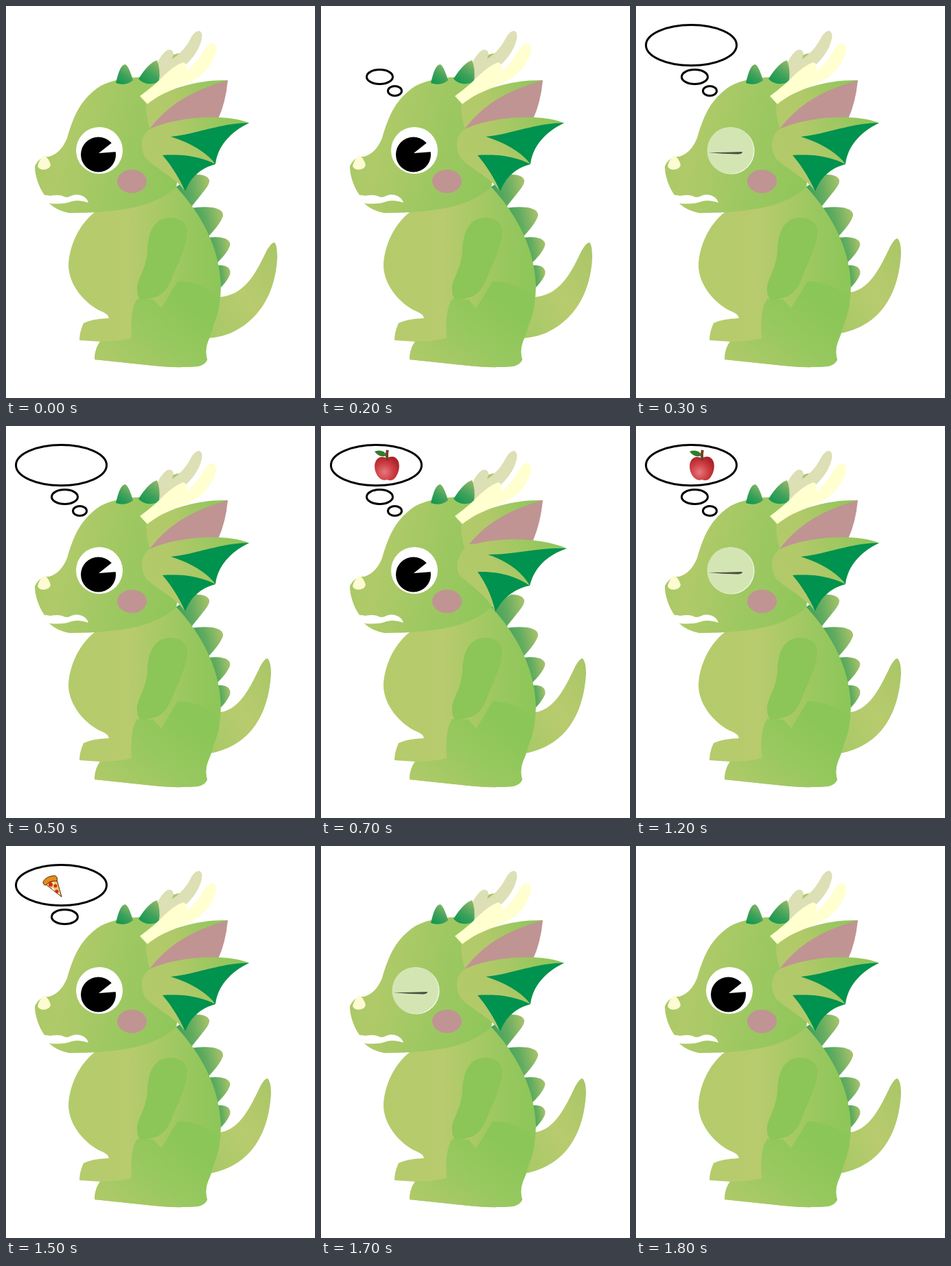
Write an HTML page that moves like this. It is 450 px wide and 570 px high and loops after 1.9 s.

```html
<!DOCTYPE html>
<html lang="en">
<head>
<meta charset="utf-8">
<title>Hungry little dragon</title>
<style>
  html, body { margin: 0; width: 100%; height: 100%; overflow: hidden; background: #fff; }
  svg { display: block; width: 100vw; height: 100vh; }

  /* The 1900 ms loop has 19 beats; every change is a hard cut. */
  .cut { animation: 1900ms step-end infinite; }
  .tail-down { animation-name: tail-down; }
  .tail-up { animation-name: tail-up; }
  .ear-rest { animation-name: ear-rest; }
  .ear-flick { animation-name: ear-flick; }
  .eye-open { animation-name: eye-open; }
  .eye-shut { animation-name: eye-shut; }
  .puff-small { animation-name: puff-small; }
  .puff-medium { animation-name: puff-medium; }
  .puff-large { animation-name: puff-large; }
  .apple { animation-name: apple; }
  .pizza { animation-name: pizza; }

  @keyframes tail-down {
    0%, 10.52%, 21.05% { visibility: visible; }
    5.26%, 15.78%, 26.31%, 100% { visibility: hidden; }
  }
  @keyframes tail-up {
    0%, 10.52%, 21.05% { visibility: hidden; }
    5.26%, 15.78%, 26.31%, 100% { visibility: visible; }
  }
  @keyframes ear-rest {
    0%, 42.1%, 52.63%, 100% { visibility: visible; }
    36.84%, 47.36% { visibility: hidden; }
  }
  @keyframes ear-flick {
    0%, 42.1%, 52.63%, 100% { visibility: hidden; }
    36.84%, 47.36% { visibility: visible; }
  }
  @keyframes eye-open {
    0%, 21.05%, 68.42%, 94.73%, 100% { visibility: visible; }
    15.78%, 63.15%, 89.47% { visibility: hidden; }
  }
  @keyframes eye-shut {
    0%, 21.05%, 68.42%, 94.73%, 100% { visibility: hidden; }
    15.78%, 63.15%, 89.47% { visibility: visible; }
  }
  @keyframes puff-small {
    0%, 78.94%, 100% { visibility: hidden; }
    5.26% { visibility: visible; }
  }
  @keyframes puff-medium {
    0%, 84.21%, 100% { visibility: hidden; }
    10.52% { visibility: visible; }
  }
  @keyframes puff-large {
    0%, 89.47%, 100% { visibility: hidden; }
    15.78% { visibility: visible; }
  }
  @keyframes apple {
    0%, 73.68%, 100% { visibility: hidden; }
    36.84% { visibility: visible; }
  }
  @keyframes pizza {
    0%, 89.47%, 100% { visibility: hidden; }
    73.68% { visibility: visible; }
  }
</style>
</head>
<body>
<svg viewBox="0 0 450 570">
  <defs>
    <linearGradient id="skin" x1="0" y1=".4" x2="1" y2=".6">
      <stop offset="0" stop-color="#a8c866"/>
      <stop offset=".2" stop-color="#b0ca69"/>
      <stop offset=".55" stop-color="#9fc862"/>
      <stop offset="1" stop-color="#8ec65a"/>
    </linearGradient>
    <linearGradient id="belly">
      <stop offset="0" stop-color="#b4cb6b"/>
      <stop offset=".4" stop-color="#b8cb6e"/>
      <stop offset=".8" stop-color="#98c75f"/>
      <stop offset="1" stop-color="#8cc658"/>
    </linearGradient>
    <linearGradient id="leg" x1="0" y1="1" x2=".8" y2=".3">
      <stop offset="0" stop-color="#b2ca6a"/>
      <stop offset=".6" stop-color="#97c85f"/>
      <stop offset="1" stop-color="#8bc658"/>
    </linearGradient>
    <linearGradient id="ear" x1="0" y1=".6" x2="1" y2=".3">
      <stop offset="0" stop-color="#b3ca6a"/>
      <stop offset=".35" stop-color="#b2c96a"/>
      <stop offset="1" stop-color="#8fc65a"/>
    </linearGradient>
    <linearGradient id="tail" x1="0" y1="1" x2="1" y2="0">
      <stop offset="0" stop-color="#a6c966"/>
      <stop offset=".5" stop-color="#b8cb6e"/>
      <stop offset="1" stop-color="#a9c667"/>
    </linearGradient>
    <linearGradient id="spike" x1="0" y1=".6" x2="1" y2=".4">
      <stop offset="0" stop-color="#369f5a"/>
      <stop offset=".5" stop-color="#62ac60"/>
      <stop offset="1" stop-color="#a4c169"/>
    </linearGradient>
    <linearGradient id="crest" x1=".2" y1="1" x2=".8" y2="0">
      <stop offset="0" stop-color="#129750"/>
      <stop offset=".45" stop-color="#3da15a"/>
      <stop offset="1" stop-color="#8eb768"/>
    </linearGradient>
    <radialGradient id="fruit" cx=".4" cy=".65" r=".65">
      <stop offset="0" stop-color="#e27a7c"/>
      <stop offset=".55" stop-color="#cf3f45"/>
      <stop offset="1" stop-color="#ad2229"/>
    </radialGradient>
  </defs>

  <!-- tail -->
  <path class="cut tail-down" fill="url(#tail)" d="M300 424L313 423C351 419 366 383 380 355Q387 343 391 344Q395 347 395 367C393 402 381 432 361 452C341 472 319 482 292 483Z"/>
  <path class="cut tail-up" fill="url(#tail)" d="M300 418L313 416C341 412 357 377 370 350Q377 337 381 338Q386 343 386 360C384 393 375 422 357 443C340 462 321 472 292 477Z"/>

  <!-- back spikes -->
  <g fill="url(#spike)">
    <path d="M246 264L277 245Q293 245 296 253Q297 258 290 267L270 292Z"/>
    <path d="M268 294Q286 291 301 293Q317 296 316 305Q313 316 294 336Z"/>
    <path d="M290 338Q306 334 319 338Q328 342 326 349Q322 360 305 376Z"/>
    <path d="M304 378Q316 375 323 380Q328 384 326 391Q321 402 310 412Z"/>
  </g>

  <!-- body -->
  <path fill="url(#belly)" d="M129 300C107 317 92 348 91 377C91 406 116 434 139 444Q149 448 150 454Q125 455 113 461Q107 474 107 486L137 488Q129 499 129 514L205 522Q245 527 280 524Q291 521 293 514Q289 501 294 488Q299 478 303 462Q313 436 313 406C311 360 293 312 247 262Z"/>
  <path fill="url(#leg)" d="M137 488Q129 499 129 514L205 522Q245 527 280 524Q291 521 293 514Q289 501 294 488L303 462Q313 438 310 424Q285 401 250 400L226 440L215 427L191 426Q180 442 183 483Q165 488 137 488Z"/>
  <path fill="#8cc558" d="M238 308C253 307 265 316 264 329C263 352 247 380 241 397Q235 415 221 422Q205 428 196 427Q190 423 191 407C195 391 205 378 206 355C207 333 213 309 238 308Z"/>

  <!-- back horn -->
  <path fill="#a6c966" d="M237 76Q247 67 257 69L249 82Z"/>
  <path fill="#dddfb5" d="M216 92Q225 70 235 64Q243 62 244 70L242 77Q260 65 269 47Q274 37 281 36Q287 38 285 48C280 70 262 92 225 109Z"/>

  <!-- head -->
  <path fill="url(#skin)" d="M42 233Q49 218 63 219Q80 214 89 192C99 158 109 135 138 116Q165 102 218 103L262 180L248 263C220 290 171 301 92 301Q73 297 63 287L57 276C49 266 42 248 42 233Z"/>
  <path fill="#fff" d="M53 276Q58 274 64 276Q75 274 82 276Q88 280 95 276Q101 273 108 275Q118 278 120 286Q106 281 96 284Q84 289 63 287Z"/>
  <path fill="#fdfbd1" d="M55 217Q62 220 65 231Q64 237 55 238Q48 238 46 233Q48 224 55 217Z"/>
  <ellipse cx="183.500" cy="255" rx="21.500" ry="17" fill="#c09492"/>

  <!-- crest and front horn -->
  <g fill="url(#crest)">
    <path d="M160 112C164 93 169 84 174 85Q179 88 185 108Q174 117 160 112Z"/>
    <path d="M193 106C203 90 212 81 220 79Q225 91 223 110Q204 118 193 106Z"/>
  </g>
  <path fill="#ffffcf" d="M195 131Q218 114 231 100Q247 85 258 82Q265 83 263 95Q278 82 287 66Q294 53 301 54Q308 57 305 69C297 92 281 107 259 114Q232 124 207 144Z"/>

  <!-- ear -->
  <path fill="url(#ear)" d="M204 144C236 118 282 107 323 108L308 164L210 180Q204 163 204 144Z"/>
  <g class="cut ear-rest">
    <path fill="#c09492" d="M209 179C237 142 273 122 323 108Q320 140 309 164Z"/>
    <path fill="url(#ear)" d="M209 179C244 162 316 155 354 170C325 184 308 205 305 230C285 235 269 248 261 270C249 251 222 239 204 222C195 207 195 190 209 179Z"/>
    <g fill="#00924f">
      <path d="M240 190C279 186 313 170 354 170C325 184 308 205 305 230C292 212 268 199 240 190Z"/>
      <path d="M228 217C258 215 283 219 305 230C285 235 269 248 261 270C252 249 240 231 228 217Z"/>
    </g>
  </g>
  <g class="cut ear-flick">
    <path fill="#c09492" d="M216 172C240 141 276 121 323 108Q320 140 309 166Z"/>
    <path fill="url(#ear)" d="M211 177C245 161 316 160 358 178C328 188 310 207 304 232C283 236 265 249 254 271C245 250 222 235 201 216C195 203 200 186 211 177Z"/>
    <g fill="#00924f">
      <path d="M243 187C282 187 318 176 358 178C328 188 310 207 304 232C292 211 270 196 243 187Z"/>
      <path d="M228 212C258 211 283 218 304 232C283 236 265 249 254 271C249 247 239 227 228 212Z"/>
    </g>
  </g>

  <!-- eye -->
  <g class="cut eye-open">
    <circle cx="136" cy="210" r="34" fill="#fff"/>
    <circle cx="134.500" cy="216" r="25.500"/>
    <path fill="#fff" d="M135 214L154 199L164 203L161 212Z"/>
  </g>
  <g class="cut eye-shut">
    <circle cx="138.500" cy="210.500" r="34" fill="#fff"/>
    <circle cx="137.500" cy="210" r="34" fill="#d4e5b4"/>
    <path fill="#4b5040" d="M105 213Q130 213 155 212Q155 215 149 215.500Q127 215 105 213Z"/>
  </g>

  <!-- thoughts -->
  <g fill="#fff" stroke="#000" stroke-width="3">
    <ellipse class="cut puff-small" cx="107.500" cy="123.500" rx="10" ry="7"/>
    <ellipse class="cut puff-medium" cx="85.500" cy="103" rx="19" ry="10.500"/>
    <ellipse class="cut puff-large" cx="80.500" cy="57" rx="66" ry="29.500"/>
  </g>
  <g class="cut apple">
    <path fill="url(#fruit)" d="M96 47Q106 41 112 50C117 60 111 74 105 78Q101 80 96 78Q91 80 87 77C79 72 75 57 81 49Q87 42 96 47Z"/>
    <path fill="#2f7d2b" d="M78 37Q91 33 96 43Q85 47 78 37Z"/>
    <path fill="none" stroke="#733f26" stroke-width="4" d="M97 35Q95 42 97 50"/>
  </g>
  <g class="cut pizza">
    <path fill="#f3c66b" stroke="#4a2410" d="M57 55L74 49L81 74Z"/>
    <path fill="#e58a1e" stroke="#5a2a08" d="M54 52Q58 44 71 43Q76 45 74 51Q63 50 58 57Q54 57 54 52Z"/>
    <g fill="#d52b1e">
      <circle cx="65" cy="56" r="3"/>
      <circle cx="72" cy="58" r="2.500"/>
      <circle cx="74" cy="66" r="2.500"/>
    </g>
    <path fill="none" stroke="#fff3d0" stroke-width="2" d="M68 53L70 55M67 61L70 64M77 69L78 70"/>
  </g>
</svg>
</body>
</html>
```
